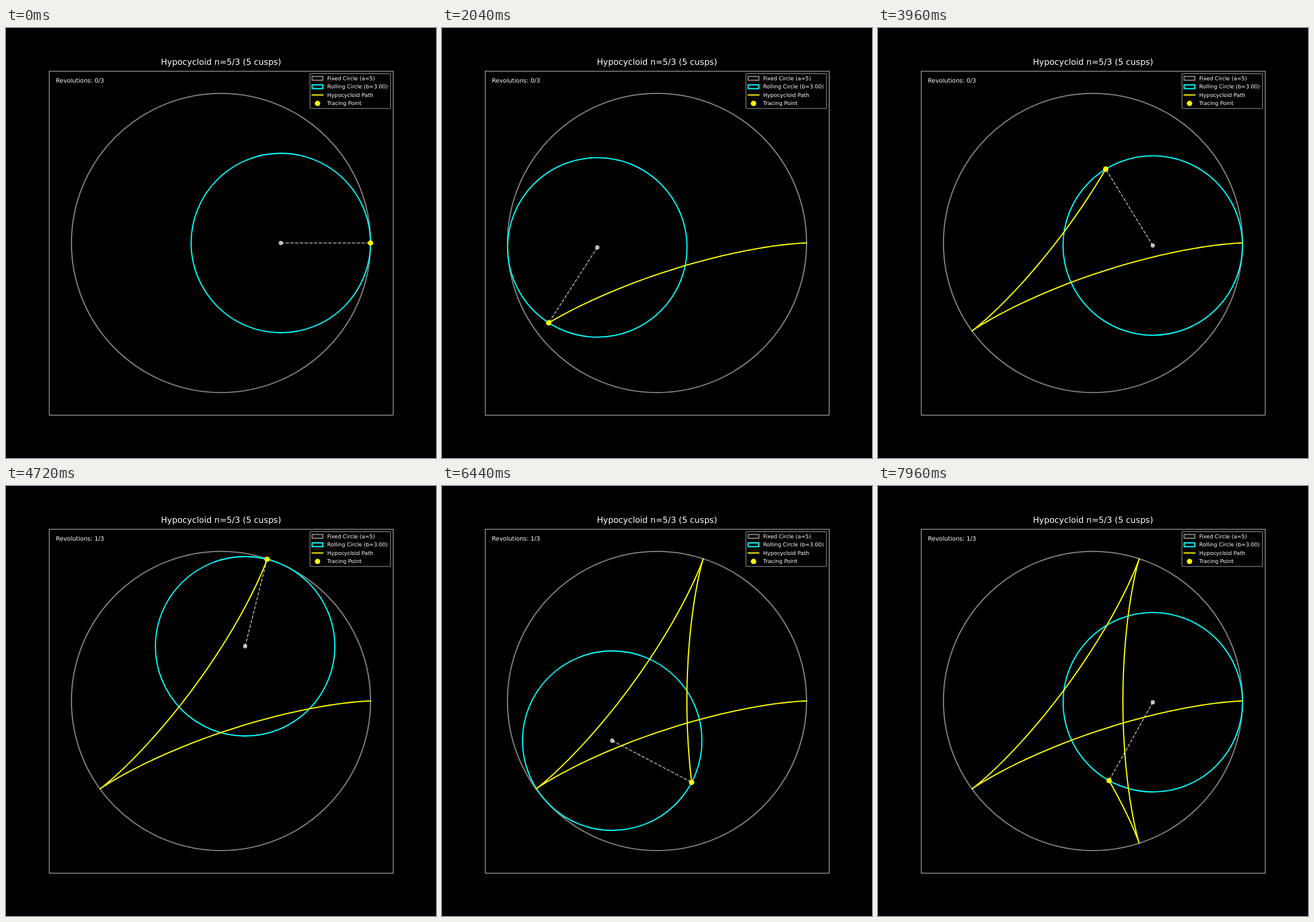
Recreate the animation shown at these times as an HTML page. Size 748 by 748 pixels, loop 8 s.

```html
<!DOCTYPE html>
<html lang="en">
<head>
<meta charset="utf-8">
<title>Hypocycloid</title>
<style>
  html, body { margin: 0; width: 100%; height: 100%; overflow: hidden; background: #000; }
  svg { display: block; width: 100vw; height: 100vh; }
  text { fill: #fff; font-family: "DejaVu Sans", sans-serif; text-rendering: geometricPrecision; }
  .legend text { font-size: 9.35px; }
  .line { fill: none; stroke-width: 2.08; }
  .fixed { stroke: #808080; }
  .rolling { stroke: #0ff; }
  .trace { stroke: #ff0; stroke-linecap: square; stroke-linejoin: round; }
  .point { fill: #ff0; }
</style>
</head>
<body>
<svg viewBox="0 0 748 748">
  <rect x="75.17" y="75.17" width="598.4" height="598.4" fill="none" stroke="#fff" stroke-width=".8"/>
  <text x="374" y="64.4" font-size="14.54" text-anchor="middle">Hypocycloid n=5/3 (5 cusps)</text>
  <text id="counter" x="86.8" y="95" font-size="10.39"></text>

  <circle class="line fixed" cx="374" cy="374" r="260.17"/>
  <circle class="line rolling" id="roller"/>
  <path class="line trace" id="trace"/>
  <circle id="hub" r="3.12" fill="#fff" fill-opacity=".7" stroke="#fff" stroke-opacity=".7" stroke-width="1.04"/>
  <line id="arm" stroke="#fff" stroke-opacity=".7" stroke-width="1.56" stroke-dasharray="5.77 2.49"/>
  <circle class="point" id="tip" r="4.67"/>

  <g class="legend">
    <rect x="528.8" y="79.5" width="140.1" height="60.6" rx="1.87" stroke="#a3a3a3" stroke-width="1.04"/>
    <rect class="line fixed" x="532.5" y="84.3" width="18.7" height="6.55"/>
    <rect class="line rolling" x="532.5" y="98.9" width="18.7" height="6.55"/>
    <path class="line trace" d="M532.5 116.5h18.7"/>
    <circle class="point" cx="541.9" cy="131.2" r="4.67"/>
    <text x="558.7" y="90.8">Fixed Circle (a=5)</text>
    <text x="558.7" y="105.4">Rolling Circle (b=3.00)</text>
    <text x="558.7" y="119.9">Hypocycloid Path</text>
    <text x="558.7" y="134.4">Tracing Point</text>
  </g>
</svg>
<script>
  const CENTER = 374, UNIT = 52.035, A = 5, B = 3;
  const STEP_MS = 40, STEPS = 200;
  const STEP_ANGLE = 6 * Math.PI / 299; // three revolutions over 300 samples

  const byId = id => document.getElementById(id);
  const [counter, roller, trace, hub, arm, tip] =
    ["counter", "roller", "trace", "hub", "arm", "tip"].map(byId);

  function setAttributes(element, values) {
    for (const name in values) element.setAttribute(name, values[name]);
  }

  function pose(step) {
    const angle = step * STEP_ANGLE;
    const spin = angle * (A - B) / B;
    const cx = CENTER + UNIT * (A - B) * Math.cos(angle);
    const cy = CENTER - UNIT * (A - B) * Math.sin(angle);
    return { cx, cy, x: cx + UNIT * B * Math.cos(spin), y: cy + UNIT * B * Math.sin(spin) };
  }

  const poses = Array.from({ length: STEPS }, (_, step) => pose(step));
  const points = poses.map(({ x, y }) => `${x.toFixed(2)} ${y.toFixed(2)}`);

  function draw() {
    const step = Math.floor(performance.now() / STEP_MS) % STEPS;
    const { cx, cy, x, y } = poses[step];
    setAttributes(roller, { cx, cy, r: UNIT * B });
    setAttributes(hub, { cx, cy });
    setAttributes(arm, { x1: cx, y1: cy, x2: x, y2: y });
    setAttributes(tip, { cx: x, cy: y });
    setAttributes(trace, { d: "M" + points.slice(0, step + 1).join("L") });
    counter.textContent = `Revolutions: ${Math.floor(step * STEP_ANGLE / (2 * Math.PI))}/3`;
    requestAnimationFrame(draw);
  }
  draw();
</script>
</body>
</html>
```
